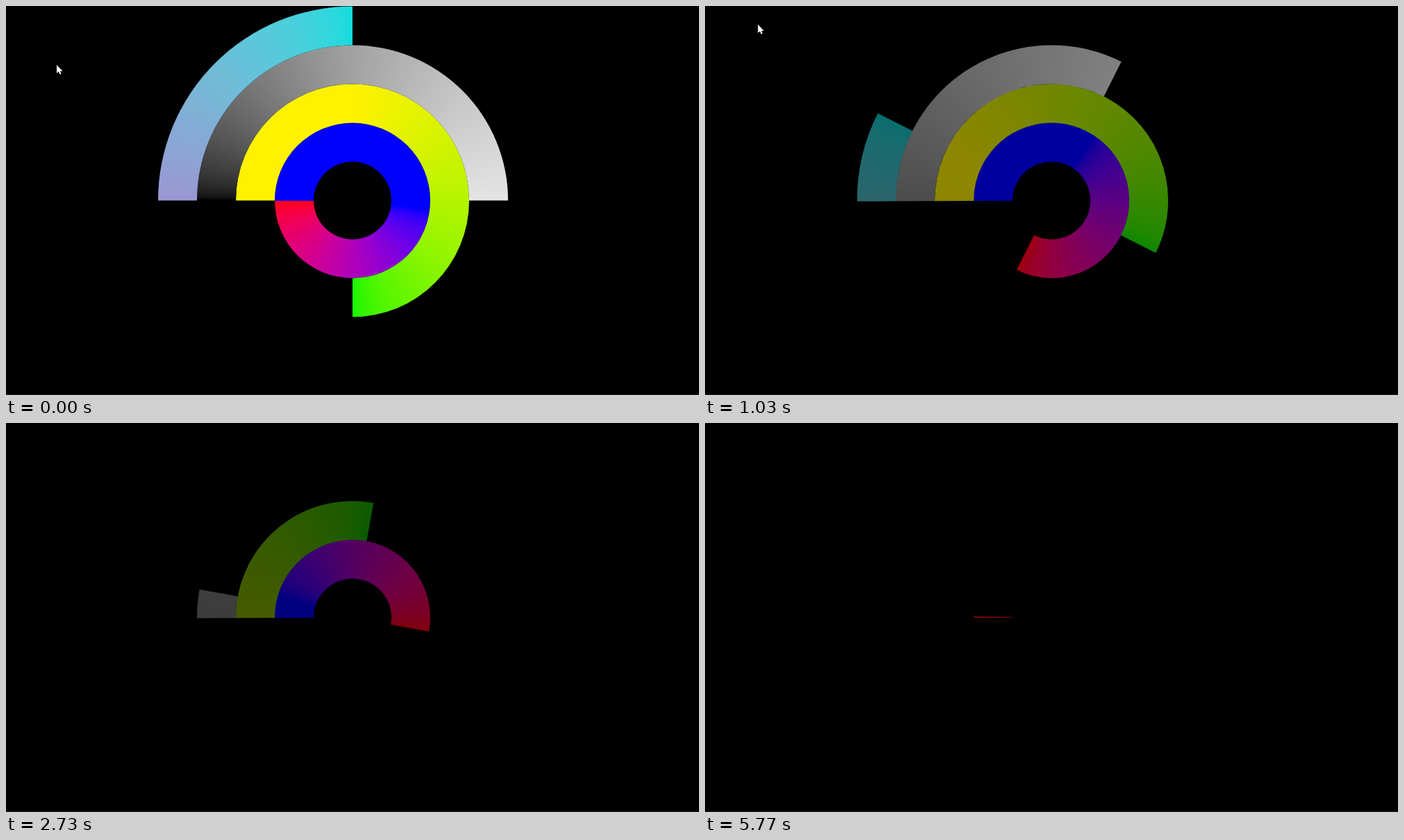
An HTML page with a canvas that plays this animation: 998 by 561 pixels, repeating every 5830 ms.

```html
<!DOCTYPE html>
<html lang="en">
<head>
<meta charset="utf-8">
<title>Rings</title>
<style>
html, body { margin: 0; width: 100%; height: 100%; overflow: hidden; background: #000; }
canvas { display: block; }
</style>
</head>
<body>
<canvas id="stage" width="998" height="561"></canvas>
<script>
const ctx = document.getElementById('stage').getContext('2d');
const LOOP = 5830, STEP = 100 / 3, LAST_STEP = 173;
const CX = 499, CY = 280.5, BAND = 56;
const RAD = Math.PI / 180;
const KEY_TIMES = [0, 670, 1400, 2730, 3430, 4430, 5770];

// span: degrees at the start; blend: degrees from tip colour to base colour
const rings = [
  { span: 360, blend: 172, tip: [255, 0, 10], base: [0, 0, 255], glow: [1, .54, .7, .5, .53, .89, .5] },
  { span: 270, blend: 180, tip: [20, 246, 0], base: [255, 242, 0], glow: [1, .35, .76, .37, .67] },
  { span: 180, blend: 180, tip: [228, 228, 228], base: [0, 0, 0], glow: [1, .2, .93, .27] },
  { span: 90, blend: 90, tip: [18, 220, 222], base: [154, 150, 210], glow: [1, 0, 1] }
];

const ease = u => (1 - Math.cos(Math.PI * u)) / 2;
const mix = (a, b, u) => a + (b - a) * u;

function keyed(times, values, t) {
  const last = values.length - 1;
  let i = 0;
  while (i < last && t >= times[i + 1]) i++;
  if (i === last) return values[last];
  return mix(values[i], values[i + 1], ease((t - times[i]) / (times[i + 1] - times[i])));
}

// Blend in linear light, approximated with a gamma of two
function blendColor(a, b, u) {
  const rgb = a.map((v, i) => Math.round(Math.sqrt(mix(v * v, b[i] * b[i], u))));
  return `rgb(${rgb})`;
}

// The gradient wraps in the middle of the gap, away from both visible ends
function ringGradient(ring, left) {
  const margin = (360 - left) / 2, stops = 120;
  const fill = ctx.createConicGradient(Math.PI - margin * RAD, CX, CY);
  for (let i = 0; i <= stops; i++) {
    const deg = left * i / stops;
    const u = Math.min(1, (left - deg) / ring.blend);
    fill.addColorStop((margin + deg) / 360, blendColor(ring.tip, ring.base, u));
  }
  return fill;
}

function drawRing(ring, index, turned, t) {
  const left = ring.span - turned;
  if (left <= 0) return;
  const start = Math.PI - Math.min(.25, turned) * RAD, end = Math.PI + left * RAD;
  const inner = BAND * (index + 1), outer = inner + BAND;
  ctx.globalAlpha = keyed(KEY_TIMES, ring.glow, t);
  ctx.fillStyle = ringGradient(ring, left);
  ctx.beginPath();
  ctx.arc(CX, CY, outer, start, end);
  ctx.arc(CX, CY, inner, end, start, true);
  ctx.fill();
  ctx.globalAlpha = 1;
}

function drawPointer(t) {
  if (t >= 1100) return;
  const times = [0, 670, 1067];
  const x = keyed(times, [73, 92, 76], t), y = keyed(times, [85, 75, 26], t);
  ctx.save();
  ctx.translate(x, y);
  ctx.fillStyle = '#fff';
  ctx.fill(new Path2D('M0 0V12L2.8 9.6L4.7 13.8L6.6 13L4.8 8.9H8.5Z'));
  ctx.restore();
}

function draw(time) {
  const step = Math.min(LAST_STEP, Math.floor((time % LOOP + 7) / STEP));
  const t = step * STEP;
  const turned = Math.max(0, 2.083 * step - 1.25);
  ctx.fillStyle = '#000';
  ctx.fillRect(0, 0, 998, 561);
  ctx.fillStyle = '#1a1a1a';
  ctx.fillRect(0, 560, 998, 1);
  rings.forEach((ring, i) => drawRing(ring, i, turned, t));
  drawPointer(t);
}

const began = performance.now();
function tick() {
  draw(performance.now() - began);
  requestAnimationFrame(tick);
}
tick();
</script>
</body>
</html>
```
